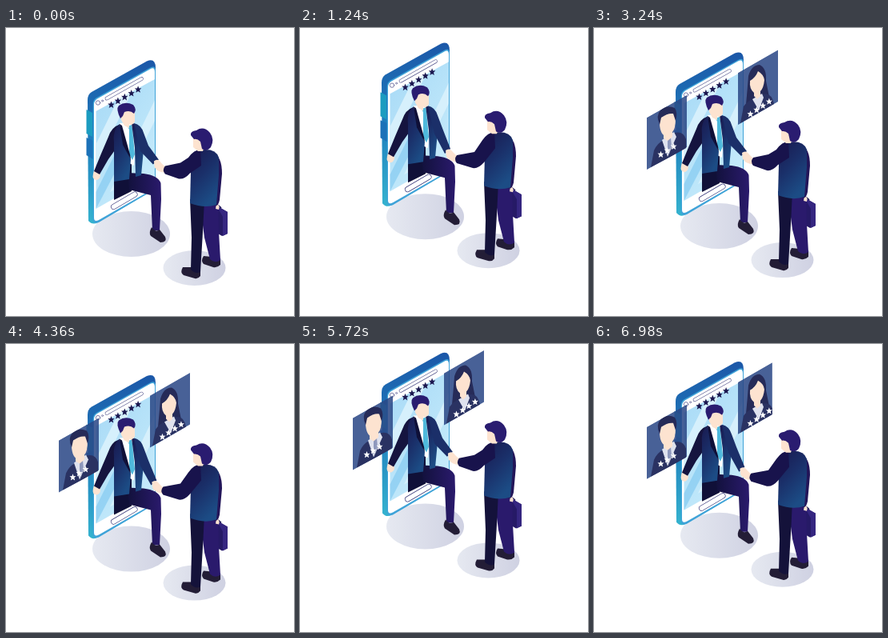
Animation, 360 px wide and 360 px high, one loop 7000 ms. Source, as an HTML page:

```html
<!DOCTYPE html>
<html lang="en">
<head>
<meta charset="utf-8">
<title>Handshake through a phone</title>
<style>
  html, body { margin: 0; width: 100%; height: 100%; overflow: hidden; background: #fff; }
  svg { display: block; width: 100vw; height: 100vh; }
</style>
</head>
<body>
<svg viewBox="0 0 360 360">
  <defs>
    <linearGradient id="shade"><stop stop-color="#e6e9f1"/><stop offset="1" stop-color="#cfd1e2"/></linearGradient>
    <linearGradient id="side" x2="0" y2="1"><stop stop-color="#1b57a8"/><stop offset=".5" stop-color="#1f7fbd"/><stop offset="1" stop-color="#35b3cf"/></linearGradient>
    <linearGradient id="screen" x2=".6" y2="1"><stop stop-color="#a6d9f6"/><stop offset="1" stop-color="#c6ebfb"/></linearGradient>
    <linearGradient id="coat" x2=".5" y2="1"><stop stop-color="#19194f"/><stop offset=".5" stop-color="#1a2f69"/><stop offset="1" stop-color="#1c4c85"/></linearGradient>
    <linearGradient id="leg"><stop stop-color="#12113c"/><stop offset="1" stop-color="#2a1a6c"/></linearGradient>
    <clipPath id="leftClip"><polygon/></clipPath>
    <clipPath id="rightClip"><polygon/></clipPath>
    <path id="star" d="M0-4.6 1.2-1.4 4.2-1.6 1.9.7 2.8 4 0 2.2-2.8 4-1.9.7-4.2-1.6-1.2-1.4Z"/>
  </defs>

  <g id="scene">
    <g fill="url(#shade)">
      <ellipse cx="156.5" cy="257.5" rx="48.5" ry="28.5"/>
      <ellipse cx="235.5" cy="300" rx="39" ry="22"/>
    </g>

    <!-- phone -->
    <path fill="url(#side)" d="M102 90Q102 83 107 80L176 41.500Q187 37 187 50V201L115 243Q108 247 103 241Z"/>
    <path fill="#1c9cc0" d="M100.500 102 108 106V136L100.500 132Z"/>
    <path fill="#1c72b8" d="M100.500 137 109 141V164L100.500 159Z"/>
    <path fill="#3fa3d8" d="M108.800 95Q108.800 90 113 87.300L180 49.800Q187 46 187 54V201L116 243Q108.800 246 108.800 238Z"/>
    <path fill="#fff" d="M110 96Q110 91 114 88.500L180 51.500Q186 48 186 55V200L116 240Q110 243 110 237Z"/>
    <path fill="url(#screen)" d="M112.500 104 186 64V184L112.500 226Z"/>
    <path fill="#d6f0fc" d="M140 89 158 79 112.500 172V145ZM186 90V116L146 196 130 205Z"/>
    <path fill="#7cc6f0" opacity=".6" d="M112.500 205 135 160V183L112.500 226Z"/>
    <g fill="none" stroke-linecap="round">
      <circle cx="115" cy="93.500" r="2.700" stroke="#4a4a86" stroke-width=".7"/>
      <circle cx="120.500" cy="91" r="1" stroke="#4a4a86" stroke-width=".6"/>
      <path stroke="#55558c" stroke-width="4.600" d="M126 88 169.500 63.500"/>
      <path stroke="#fff" stroke-width="3.400" d="M126 88 169.500 63.500"/>
      <path stroke="#3c3c7c" stroke-width="7" d="M134.500 223.500 161 208"/>
      <path stroke="#fff" stroke-width="5.600" d="M134.500 223.500 161 208"/>
    </g>
    <g id="rating" fill="#1b174f"></g>

    <!-- man stepping out -->
    <path fill="#101038" d="M135 160H157V204L135 215Z"/>
    <path fill="url(#leg)" d="M152 181 172 182Q190 184 193.500 194L194 214 192 253H183L181 209 154 202Z"/>
    <path fill="#231d36" d="M182 249Q187 256 192 252L199 261Q202 268 193 268L181 260Q178 256 182 249Z"/>
    <path fill="#fde3d0" d="M110 178 117 180Q120 187 114 190 107 190 109 182Z"/>
    <path fill="#15143f" d="M141 121Q132 124 128 136L119 157 110 179 117 183 128 164 138 150Z"/>
    <path fill="#fff" d="M142 119 156 118 162 128 160 172 148 166Z"/>
    <path fill="#4fb9dc" d="M152 123 157 121 158 126 161 158 158 165 154 158 154 127Z"/>
    <path fill="url(#coat)" d="M142 120 149 145 156 164 154 189 135 192V143Q133 127 142 120Z"/>
    <path fill="url(#coat)" d="M157 119Q167 120 171 130L172 152 169 184 162 186 161 150Z"/>
    <path id="greetArm" fill="#1b2f69"/>
    <path fill="#0f1038" d="M142 120 145 122 155 158 156 164 146 146Z"/>
    <path fill="#fde3d0" d="M143 104Q154 97 161 104L161 117Q157 123 154 120L154 125 148 122 144 115Z"/>
    <path fill="#2a1c70" d="M143 113Q137 101 141 97 149 91 159 96 164 102 160 107 155 102 148 105L146 110Z"/>

    <!-- man from behind -->
    <path fill="#261a66" d="M250 232 263 222 277 230V257L270 260 250 248Z"/>
    <path fill="#352680" d="M263 222 277 230V257L271 260V236Z"/>
    <path fill="none" stroke="#1b1552" stroke-width="1.500" d="M260 226Q262 217 269 225"/>
    <path fill="#231d36" d="M221 299 232 299 243 304V310Q240 314 236 313L222 309Q217 306 221 299Z"/>
    <path fill="#231d36" d="M247 285 257 286 268 290V296Q264 300 259 299L247 295Q243 291 247 285Z"/>
    <path fill="#2a1a6c" d="M242 215H265L266 255 268 290Q261 295 255 289L248 262Z"/>
    <path fill="#14123a" d="M230 214H248L246 255 243 305Q237 308 231 302L232 262Z"/>
    <path fill="#fde3d0" d="M263 220Q268 221 266 227L262 226Z"/>
    <path fill="#231659" d="M258 155Q270 160 270 182L267 215Q265 224 260 222L256 188Z"/>
    <path fill="url(#coat)" d="M240 153Q262 149 266 162L266 184 263 221Q248 226 230 219L231 180Z"/>
    <path id="hands" fill="#fde3d0"/>
    <path id="shakeArm" fill="#18134c"/>
    <path fill="#fde3d0" d="M234 137 245 136 248 148 246 154 240 154 234 149Z"/>
    <path fill="#2a1c70" d="M231 134Q230 129 238 128 247 122 255 131 261 139 256 149 251 155 245 151L243 142Q239 138 235 139Z"/>

    <!-- candidate cards -->
    <g clip-path="url(#leftClip)">
      <path fill="#2b4886" opacity=".86" d="M66 122 116 94V159L66 187Z"/>
      <path fill="#2a3262" d="M71 184 75 163Q79 154 87 150L100 141Q112 138 115 149V161Z"/>
      <path fill="#dfe2ee" d="M85 150 100 140 103 146 92 171Z"/>
      <path fill="#8e98bc" d="M92 150 96 147 97 158 92 168Z"/>
      <path fill="#fde3d0" d="M82 121 99 112 102 123Q102 136 98 140V146L92 151 87 148V144Q81 139 82 121Z"/>
      <path fill="#262b58" d="M82 131Q77 119 83 113 91 105 101 110 105 116 102 126L99 117Q92 116 84 122Z"/>
      <g id="leftStars" fill="#fff"></g>
    </g>
    <g clip-path="url(#rightClip)">
      <path fill="#2b4886" opacity=".86" d="M180 66 230 37V102L180 131Z"/>
      <path fill="#262b58" d="M190 105Q192 84 193 70 197 56 207 56 216 60 215 76L219 96Z"/>
      <path fill="#2a3262" d="M183 129 187 108Q192 101 200 98L211 93Q222 90 225 105Z"/>
      <path fill="#dfe2ee" d="M198 99 210 92 212 97 206 113Z"/>
      <path fill="#fde3d0" d="M195 76Q202 72 205 64 212 68 213 75 212 85 208 89V95L204 99 200 95V91Q194 86 195 76Z"/>
      <g id="rightStars" fill="#fff"></g>
    </g>
  </g>
</svg>
<script>
const LOOP = 7000, STEP = 112, RISE = 31, SHAKE = 800;
const turns = [0, 2000, 4080, 6000, 8080];
const $ = id => document.getElementById(id);
const clamp = v => Math.min(1, Math.max(0, v));
const ease = p => p < .5 ? 2 * p * p : 1 - 2 * (1 - p) ** 2;

function addStars(id, count, x, y, dx, dy, size) {
  $(id).innerHTML = Array.from({ length: count }, (_, i) =>
    `<use href="#star" transform="translate(${x + i * dx} ${y + i * dy}) scale(${size})"/>`).join('');
}
addStars('rating', 5, 131.500, 96, 8.400, -4.800, 1);
addStars('leftStars', 3, 83.500, 168, 8, -5, .95);
addStars('rightStars', 4, 195.500, 117.500, 7.800, -5.200, .95);

// Slanted card window between two x positions; y is its top at x0.
function setWindow(id, x0, a, b, y) {
  const top = x => y - (x - x0) * .57;
  $(id).firstElementChild.setAttribute('points',
    [[a, top(a)], [b, top(b)], [b, top(b) + 66], [a, top(a) + 66]].join(' '));
}

function lift(t) {
  const i = turns.findIndex((start, n) => t < turns[n + 1]);
  const p = ease((t - turns[i]) / (turns[i + 1] - turns[i]));
  return -RISE * (i % 2 ? 1 - p : p);
}

// Both forearms follow the clasped hands.
function drawArms(t) {
  const swing = -Math.cos(2 * Math.PI * (t / SHAKE - .07));
  const x = 188.500 - 1.500 * swing, y = 175.500 + 4.500 * swing;
  $('hands').setAttribute('d',
    `M${x - 5} ${y - 5}Q${x} ${y - 9} ${x + 4} ${y - 3}L${x + 9} ${y + 2} ${x + 9} ${y + 9}Q${x} ${y + 9} ${x - 4} ${y + 3}Z`);
  $('greetArm').setAttribute('d',
    `M160 119Q169 121 172 131L178 147 ${x + 1} ${y - 7} ${x - 6} ${y - 1} 168 154Z`);
  $('shakeArm').setAttribute('d',
    `M243 152Q235 152 228 162L218 ${y - 3} ${x + 9} ${y + 1}Q${x + 5} ${y + 6} ${x + 9} ${y + 11}` +
    `L216 ${y + 17}Q223 ${y + 18} 230 ${y + 10}L244 172Z`);
}

function draw() {
  const t = Math.floor(((performance.now() - begin) % LOOP + 10) / STEP) * STEP;
  $('scene').setAttribute('transform', `translate(0 ${lift(t).toFixed(2)})`);
  drawArms(t);
  setWindow('leftClip', 66, 116 - 50 * clamp((t - 1570) / 1100), 116, 122);
  const shown = Math.min(clamp((t - 1290) / 1000), clamp((7800 - t) / 1000));
  setWindow('rightClip', 180, 180, 180 + 50 * shown, 66);
  requestAnimationFrame(draw);
}

const begin = performance.now();
draw();
</script>
</body>
</html>
```
